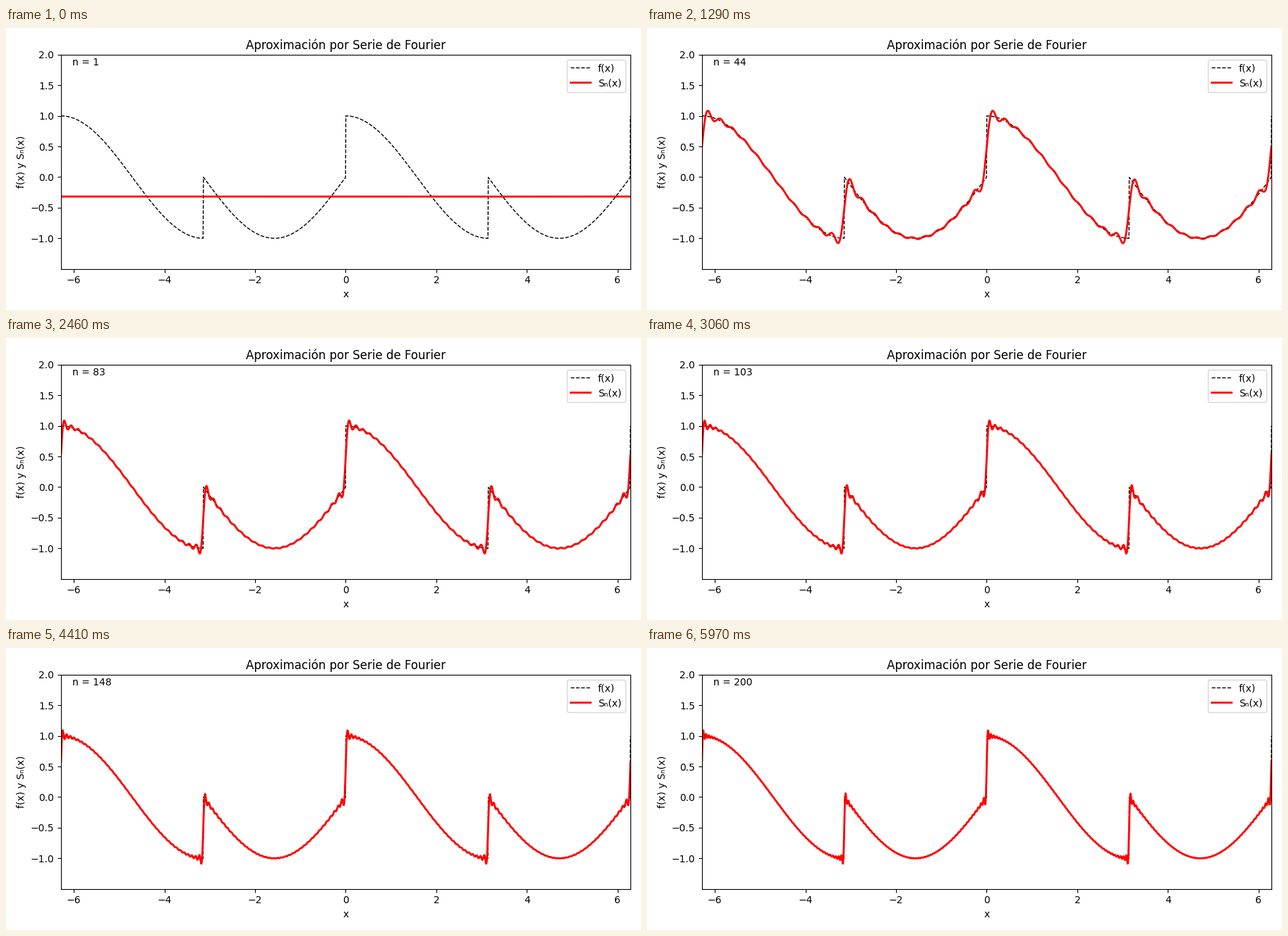
Animation, 900 px wide and 400 px high, one loop 6000 ms. Source, as a matplotlib script:

```python
import numpy as np
import matplotlib.pyplot as plt
from matplotlib.animation import FuncAnimation

TERMS = 200
L = 2 * np.pi

x = np.linspace(-L, L, 2000)
phase = x % (2 * np.pi)
f = np.where(phase < np.pi, np.cos(phase), np.sin(phase))

# Trapezoid weights over the whole interval
w = np.full(x.size, x[1] - x[0])
w[[0, -1]] /= 2

k = np.arange(1, TERMS + 1)[:, None]
cos_k, sin_k = np.cos(k * np.pi * x / L), np.sin(k * np.pi * x / L)
a0 = (w * f).sum() / L
a = cos_k @ (w * f) / L
b = sin_k @ (w * f) / L
sums = a0 / 2 + np.cumsum(a[:, None] * cos_k + b[:, None] * sin_k, axis=0)

fig, ax = plt.subplots(figsize=(9, 4), dpi=100)
ax.plot(x, f, "k--", lw=1, label="f(x)")
line, = ax.plot(x, sums[0], "r", lw=2, label="Sₙ(x)")
label = ax.text(0.02, 0.95, "n = 1", transform=ax.transAxes)
ax.set_xlim(-L, L)
ax.set_ylim(f.min() - 0.5, f.max() + 1)
ax.set_title("Aproximación por Serie de Fourier")
ax.set_xlabel("x")
ax.set_ylabel("f(x) y Sₙ(x)")
ax.legend(loc="upper right")
fig.tight_layout()


def update(i):
    line.set_ydata(sums[i])
    label.set_text(f"n = {i + 1}")
    return line, label


anim = FuncAnimation(fig, update, frames=TERMS, interval=30, repeat=True)
plt.show()
```
